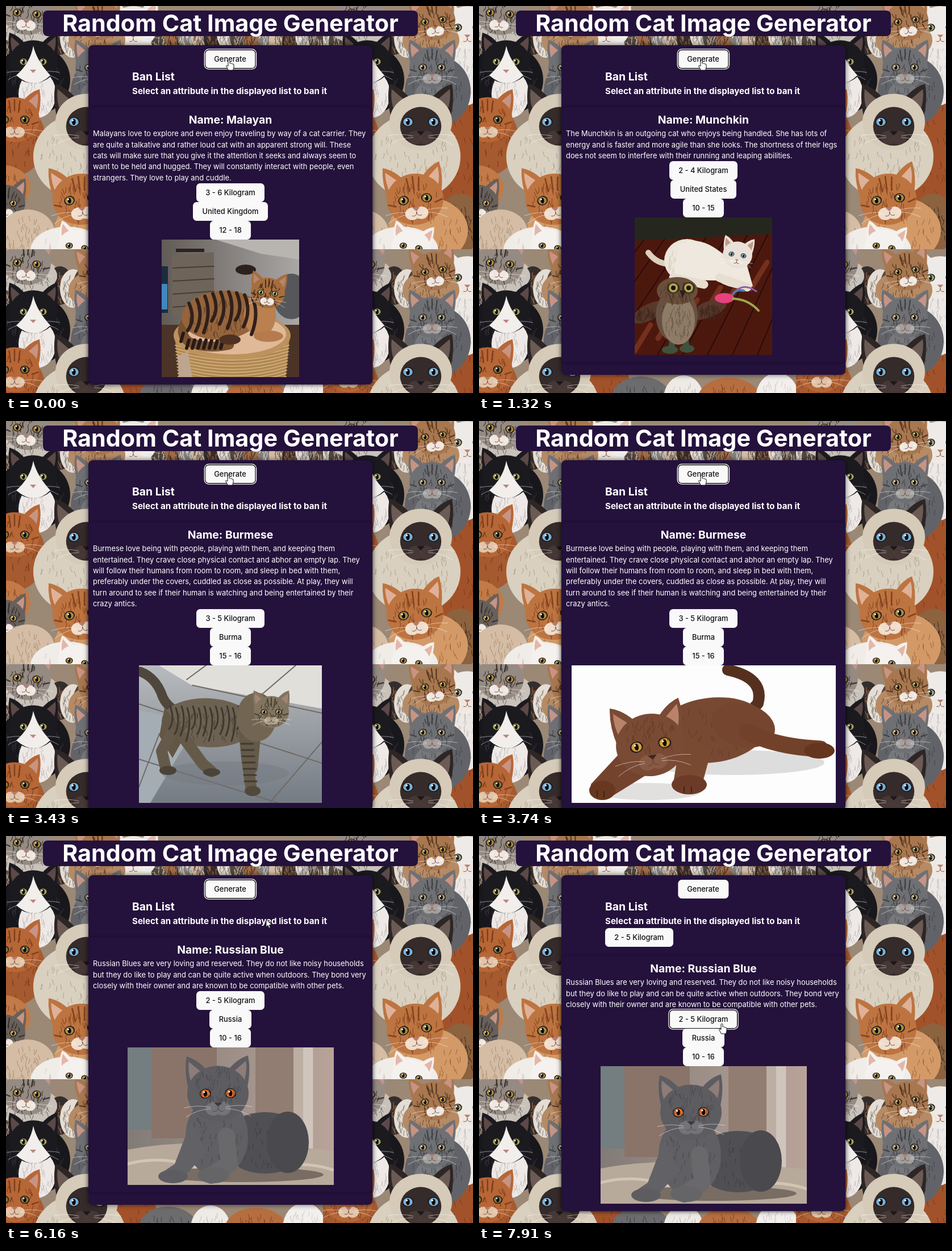
Write an HTML page that moves like this. It is 822 px wide and 681 px high and loops after 8 s.

```html
<!DOCTYPE html>
<html lang="en">
<head>
<meta charset="utf-8">
<title>Random Cat Image Generator</title>
<style>
html, body { margin: 0; width: 100%; height: 100%; overflow: hidden; }
body { position: relative; font: 12.9px/19.36px Inter, sans-serif; color: #fff; white-space: nowrap; }
svg { display: block; }
#backdrop { position: absolute; left: 0; top: 0; }
h1, h2, h3, p { margin: 0; font-weight: 700; }
h1 { position: absolute; left: 65px; top: 8px; width: 660px; height: 45px; border-radius: 8px;
  background: #24113c; text-align: center; font-size: 41.3px; line-height: 45px; }
#panel { position: absolute; left: 145px; top: 69px; width: 500px; min-height: 580px;
  border-radius: 8px; background: #24113c; box-shadow: 0 0 10px #0009; }
#bans { position: relative; height: 109px; }
#bans > * { position: absolute; left: 77px; }
#bans h2 { top: 41px; }
#bans h3 { top: 71px; font-size: 15.1px; line-height: 20px; }
h2 { font-size: 19.36px; line-height: 28px; }
#bans #generate { left: 250px; top: 8px; transform: translateX(-50%); margin-left: -.5px; }
#ban { top: 93px; }
#card { padding: 8px 0 13px; border-radius: 8px; box-shadow: 0 0 5px #0006; display: flex;
  flex-direction: column; align-items: center; }
#card h2 { margin-bottom: 1.2px; }
#card p { align-self: flex-start; margin-left: 8px; font-weight: 400; white-space: pre; }
.button { box-sizing: border-box; height: 33px; padding: 0 16.3px; border-radius: 6.5px;
  background: #f9f9f9; color: #111; font-weight: 500; line-height: 33px; }
.hover { box-shadow: inset 0 0 0 1px #646cff; }
.focus { box-shadow: inset 0 0 0 1px #101010, 0 0 0 .6px #101010, 0 0 0 1.8px #fff; }
#cursor { position: absolute; left: 0; top: 0; overflow: visible; }
</style>
</head>
<body>
<svg id="backdrop" width="822" height="681"></svg>
<h1>Random Cat Image Generator</h1>
<div id="panel">
  <div id="bans">
    <div id="generate" class="button">Generate</div>
    <h2>Ban List</h2>
    <h3>Select an attribute in the displayed list to ban it</h3>
    <div id="ban" class="button">2 - 5 Kilogram</div>
  </div>
  <div id="card">
    <h2 id="name"></h2>
    <p id="about"></p>
    <div id="weight" class="button"></div>
    <div id="origin" class="button"></div>
    <div id="life" class="button"></div>
    <svg id="photo" height="242"></svg>
  </div>
</div>
<svg id="cursor" width="1" height="1">
  <path id="arrow" d="M0 0V13L3 10.2L5 15L7.2 14L5.2 9.5H9.5Z" fill="#fff" stroke="#111" stroke-width=".9"/>
  <path id="hand" d="M-1.5 1.2Q0-1 1.5 1.2V6Q3 4.8 4 6.5Q5.6 5.6 6.4 7.2Q8.6 6.6 8.6 9V12Q8.4 15 7 18H-1L-5 10.6Q-4.6 8.4-1.5 11Z"
    fill="#fff" stroke="#111"/>
</svg>
<script>
const $ = id => document.getElementById(id);
let seed = 7;
const rand = (a = 0, b = 1) => a + (b - a) * ((seed = seed * 16807 % 2147483647) / 2147483647);

// Drawing helpers return SVG markup.
const rect = (x, y, w, h, fill, rx = 0) => `<rect x="${x}" y="${y}" width="${w}" height="${h}" rx="${rx}" fill="${fill}"/>`;
const oval = (x, y, rx, ry, fill, turn = 0) =>
  `<ellipse cx="${x}" cy="${y}" rx="${rx}" ry="${ry}" fill="${fill}" transform="rotate(${turn} ${x} ${y})"/>`;
const shape = (d, fill) => `<path d="${d}" fill="${fill}"/>`;
const line = (d, stroke, w = 1) =>
  `<path d="${d}" fill="none" stroke="${stroke}" stroke-width="${w}" stroke-linecap="round" stroke-linejoin="round"/>`;
const fade = (id, from, to, turn = 90) =>
  `<linearGradient id="${id}" gradientTransform="rotate(${turn})"><stop stop-color="${from}"/><stop offset="1" stop-color="${to}"/></linearGradient>`;
const repeat = (n, draw) => Array.from({ length: n }, (_, i) => draw(i)).join('');

function hairs(x, y, rx, ry, color, n = 50, len = 9, w = 1) {
  return line(repeat(n, () => {
    const a = rand(0, 6.283), r = Math.sqrt(rand()) * .92;
    return `M${(x + rx * r * Math.cos(a)).toFixed(1)} ${(y + ry * r * Math.sin(a)).toFixed(1)}q${rand(-2, 2).toFixed(1)} ${(len / 2).toFixed(1)} ${rand(-4, 4).toFixed(1)} ${len}`;
  }), color, w);
}

const body = (x, y, rx, ry, fill, hair, turn = 0) =>
  oval(x, y, rx, ry, fill, turn) + (hair ? hairs(x, y, rx * .9, ry * .8, hair) : '');

function head(x, y, r, fur, { ear = '#c79484', eye = '#a98b45', muzzle = '#efe7df', hair, mask, tilt = 0, nose = '#b77b70', ears = fur } = {}) {
  const side = s => shape(`M${s * .3 * r} ${-.7 * r}Q${s * .6 * r} ${-1.1 * r} ${s * r} ${-1.22 * r}Q${s * 1.1 * r} ${-.7 * r} ${s * .94 * r} ${-.1 * r}Z`, ears)
    + shape(`M${s * .5 * r} ${-.68 * r}L${s * .93 * r} ${-1.05 * r}Q${s * .98 * r} ${-.7 * r} ${s * .84 * r} ${-.32 * r}Z`, ear);
  const eyeAt = s => oval(s * .41 * r, 0, .19 * r, .16 * r, '#231a17', s * 10)
    + oval(s * .41 * r, 0, .15 * r, .13 * r, eye) + oval(s * .41 * r, 0, .06 * r, .1 * r, '#080808')
    + oval(s * .41 * r - .04 * r, -.05 * r, .03 * r, .03 * r, '#fff');
  const whiskers = s => line(`M${s * .25 * r} ${.45 * r}q${s * .4 * r} ${-.1 * r} ${s * .85 * r} 0M${s * .25 * r} ${.5 * r}q${s * .4 * r} 0 ${s * .8 * r} ${.25 * r}`, '#fff9', .8);
  return `<g transform="translate(${x} ${y}) rotate(${tilt})">` + side(-1) + side(1)
    + oval(0, 0, r, .9 * r, fur)
    + (hair ? hairs(0, 0, r * .9, r * .75, hair, 45, r / 5, 1.1)
      + line(`M${-.22 * r} ${-.75 * r}L${-.16 * r} ${-.3 * r}M0 ${-.8 * r}V${-.36 * r}M${.22 * r} ${-.75 * r}L${.16 * r} ${-.3 * r}M${-.95 * r} ${.1 * r}l${.25 * r} ${.08 * r}M${.95 * r} ${.1 * r}l${-.25 * r} ${.08 * r}`, hair, r / 18) : '')
    + (mask ? oval(0, .14 * r, .66 * r, .62 * r, mask) : '')
    + oval(-.16 * r, .5 * r, .25 * r, .22 * r, muzzle) + oval(.16 * r, .5 * r, .25 * r, .22 * r, muzzle)
    + shape(`M${-.13 * r} ${.3 * r}H${.13 * r}L0 ${.43 * r}Z`, nose)
    + line(`M${-.16 * r} ${.58 * r}Q0 ${.62 * r} 0 ${.44 * r}Q0 ${.62 * r} ${.16 * r} ${.58 * r}`, '#5a3c34', .8)
    + eyeAt(-1) + eyeAt(1) + whiskers(-1) + whiskers(1) + '</g>';
}

const furTones = ['#e5ddd3', '#514741', '#a26b45', '#85807c', '#d3bca5', '#332d2c'];
const kittens = rect(-30, -12, 588, 440, '#9b8875')
  + repeat(26, i => body(-20 + i * 23, 55 + rand(-12, 12), 23, 34, furTones[i % 6], furTones[(i + 3) % 6]))
  + body(212, 250, 55, 110, '#a2522a', '#743719')
  + body(222, 100, 38, 75, '#ece8e5', '#c9c1bc')
  + head(224, 38, 42, '#eeeae7', { eye: '#a6a47a', ear: '#e2b8a8' })
  + body(160, 60, 50, 35, '#b58a64', '#6e4a30')
  + head(165, 26, 38, '#a8774f', { hair: '#54351f', tilt: -8 })
  + body(35, 35, 55, 32, '#c9c2ba', '#6f6761')
  + head(37, 13, 42, '#958b83', { hair: '#3b3532', tilt: 5 })
  + body(172, 150, 58, 62, '#626368', '#3f4147')
  + body(158, 165, 28, 35, '#77787c', '#4b4d52')
  + head(162, 108, 40, '#6f7074', { hair: '#3e4044', muzzle: '#a3a09e', eye: '#a69a78' })
  + body(48, 130, 65, 62, '#18171c', '#343239')
  + body(55, 155, 33, 42, '#eee9e6', '#c5bebc')
  + head(48, 98, 42, '#1b1a1f', { eye: '#a3a366', ear: '#5d4948' })
  + shape('M48 70Q54 96 78 122Q50 150 18 122Q43 100 48 70', '#f1eeeb') + shape('M42 112h11l-5 6z', '#bd8580')
  + body(10, 235, 60, 65, '#a65a2f', '#783719')
  + head(15, 200, 44, '#b76636', { hair: '#7f3f1d', eye: '#88773f', muzzle: '#e2c4a8' })
  + body(130, 265, 82, 75, '#d9d0c0', '#aca08d')
  + head(142, 204, 55, '#d6cbb9', { ears: '#2d2625', ear: '#6c5b55', mask: '#352b2a', muzzle: '#463836', nose: '#1d1718', eye: '#78b1dc' })
  + body(285, 250, 52, 38, '#6c6b6d', '#403f42')
  + body(360, 250, 35, 40, '#eeeae6', '#c6bdb6')
  + body(440, 252, 55, 38, '#b66e3f', '#7d431f')
  + body(525, 250, 38, 45, '#f2efed', '#d7d0cc')
  + body(-5, 320, 48, 40, '#c17a48', '#824722')
  + body(212, 382, 40, 52, '#8c623f', '#3b281c')
  + body(155, 395, 70, 58, '#d39a68', '#a46336')
  + head(132, 340, 50, '#bd7440', { hair: '#854420', muzzle: '#f0ddcb', ear: '#deb198', tilt: -7 })
  + head(-2, 347, 36, '#68605b', { hair: '#342d29', eye: '#b79b54' })
  + body(38, 400, 48, 42, '#d5bda5', '#a88d76')
  + body(108, 430, 65, 42, '#f0ece8', '#d4c8c0')
  + head(125, 424, 34, '#f5f1ee', { ear: '#e3b7a8', tilt: 10 });

$('backdrop').innerHTML = `<pattern id="tile" patternUnits="userSpaceOnUse" x="-30" y="-12" width="588" height="440" viewBox="-30 -12 588 440">${kittens}</pattern>`
  + rect(0, 0, 822, 681, 'url(#tile)');

const stripes = (n, draw, color, w) => line(repeat(n, draw), color, w);

const photos = {
  toyger: [242, () => fade('wall', '#615b57', '#aaa7a5', 0) + rect(0, 0, 242, 242, 'url(#wall)')
    + shape('M95 0H242V35L175 25Z', '#b7b4b1') + rect(0, 150, 242, 92, '#4b3327')
    + shape('M18 28L92 22V135H18Z', '#6f6459') + stripes(4, i => `M20 ${50 + i * 23}L92 ${47 + i * 22}`, '#453d37', 2)
    + rect(0, 47, 11, 82, '#1c2c3d') + rect(0, 78, 10, 45, '#4087bd') + oval(148, 53, 18, 9, '#2c211d') + rect(25, 16, 50, 6, '#292423')
    + oval(228, 100, 32, 40, '#55575a') + shape('M22 165L32 242H218L226 165Z', '#ad8651')
    + stripes(11, i => `M${24 + i * .5} ${186 + i * 5.5}Q125 ${216 + i * 5.5} ${224 - i * .5} ${186 + i * 5.5}`, '#d0ab75', 2)
    + oval(124, 169, 103, 42, '#bd925d') + oval(124, 166, 95, 36, '#dfb998') + shape('M28 205l18-8 8 45H30z', '#bda58f')
    + line('M65 118Q20 160 48 180Q80 194 119 185', '#785030', 17) + stripes(8, i => `M${38 + i * 10} ${165 + (i ? 12 : 0)}l-4 14`, '#261a16', 6)
    + body(105, 133, 70, 43, '#95643b', '#5c3820', -5) + oval(173, 133, 28, 38, '#ba8050')
    + stripes(9, i => `M${48 + i * 14} ${112 - Math.sin(i / 3) * 20}q12 28-2 ${48 + i % 3 * 8}`, '#30201a', 6)
    + oval(120, 176, 19, 9, '#4e3123') + oval(188, 170, 26, 10, '#b57b4c')
    + head(187, 94, 30, '#a66e3d', { hair: '#37221a', eye: '#a7b46a', ear: '#b58670', tilt: 6 })],

  owl: [242, () => rect(0, 0, 242, 242, '#4c180e')
    + stripes(11, i => `M${-180 + i * 44} 242L${-10 + i * 35} 28`, '#2a0b08', 2)
    + stripes(7, i => `M${i * 41} ${235 - i * 22}l28-46`, '#74301c', 9)
    + shape('M0 0H242V29L0 41Z', '#25271f') + line('M68 82Q40 84 24 62', '#ddd0bd', 10)
    + body(92, 76, 40, 38, '#ece5d9', '#d2c7b7') + shape('M78 48Q113 27 160 68L196 78L208 121Q178 132 144 111L67 110Z', '#eee8de')
    + line('M68 106L122 118M149 106L198 123', '#e7ded0', 15)
    + head(181, 66, 26, '#e9e1d7', { eye: '#77a3b8', ear: '#c49888', tilt: 8 })
    + body(25, 167, 33, 14, '#58382a', '#3c251d', -28) + body(130, 162, 34, 14, '#58382a', '#3c251d', -22)
    + line('M69 205l-5 27M89 206l2 25', '#40523d', 11) + oval(62, 233, 14, 7, '#40523d') + oval(92, 231, 13, 7, '#40523d')
    + body(74, 172, 37, 48, '#665042', '#49372e') + body(77, 181, 29, 43, '#8e7b67', '#6c5948')
    + body(75, 129, 36, 24, '#694f3b', '#49352a') + repeat(2, i => oval(68 + i * 27, 124, 11, 10, '#302c21') + oval(68 + i * 27, 124, 8, 8, '#b4a14b') + oval(68 + i * 27, 124, 4, 4, '#17140f'))
    + shape('M79 128l5 15 6-14z', '#302019') + oval(158, 142, 17, 9, '#e6417e')
    + line('M171 137q18-25 43-7', '#8960ae', 3) + line('M173 143q27 1 45 21', '#9aa948', 4) + line('M174 134q5-8 18-5', '#5579a8', 4)],

  kitchen: [322, () => rect(0, 0, 322, 242, '#574231') + rect(0, 0, 104, 84, '#b78b4f') + rect(0, 0, 38, 82, '#3a5875')
    + rect(66, 35, 35, 45, '#c5a34e') + rect(103, 0, 20, 85, '#332720') + rect(125, 8, 105, 76, '#a77743')
    + rect(230, 0, 92, 83, '#6f5137') + rect(245, 29, 77, 52, '#3975a3') + rect(0, 0, 322, 10, '#322822')
    + rect(0, 80, 322, 9, '#241a17') + rect(0, 89, 322, 58, '#2d211c') + stripes(22, i => `M${i * 16} 90v56`, '#493326', 1)
    + rect(10, 43, 20, 33, '#a4a29f', 3) + oval(106, 68, 26, 18, '#1e1919') + rect(86, 41, 11, 42, '#8b7b69')
    + rect(0, 139, 322, 103, '#816038') + hairs(161, 194, 170, 55, '#b18b55', 190, 2, 2) + hairs(161, 194, 170, 55, '#443423', 190, 2, 1.5)
    + shape('M10 139H115L102 190L3 173Z', '#161719') + line('M8 172L105 187L120 139', '#817c74', 3) + line('M65 132V108Q83 91 91 111', '#b8b8b1', 5)
    + rect(235, 93, 25, 68, '#655e59', 5) + rect(240, 96, 5, 62, '#b5b1ad') + rect(283, 93, 20, 13, '#e65532', 3)
    + shape('M281 106h24l5 22-2 52q-18 8-37 0l-2-53z', '#b6733b') + rect(274, 137, 30, 29, '#777c6a', 2)
    + line('M210 119Q220 70 206 38L181 18', '#e3cda9', 22) + body(178, 144, 61, 48, '#ead9bd', '#cfb490')
    + line('M137 164L157 224M164 177L160 211M208 165L204 201M225 151L225 206', '#e9d7bd', 23) + oval(158, 226, 13, 10, '#eee2cc')
    + oval(145, 143, 36, 38, '#eadbc5') + head(126, 110, 33, '#ead9c2', { ear: '#d8a88b', eye: '#8a8155', tilt: -5 })],

  terrace: [322, () => fade('stone', '#b8bbbe', '#747b83') + rect(0, 0, 322, 242, 'url(#stone)')
    + shape('M35 0H322V76L93 35Z', '#e0dfda') + shape('M0 79L105 99L20 242H0Z', '#a4adb4')
    + line('M0 68L322 172M-10 162L245 242M94 35L322 84M36 120L0 214M322 135L230 242M118 0L84 25M276 0L213 54', '#706a64', 2)
    + oval(152, 190, 112, 21, '#70777d66') + line('M60 77Q44 66 39 48Q27 20 2 11', '#50473c', 17)
    + body(122, 101, 82, 43, '#6d6251', '#463d32', 3) + shape('M45 75L36 124L59 163L82 122Z', '#625646')
    + line('M56 120L40 151L47 180M79 128L112 173L128 187M185 112L190 163L198 220M205 116L199 181', '#655a49', 20)
    + oval(51, 185, 15, 8, '#4b4338') + oval(128, 188, 15, 7, '#4b4338') + oval(200, 221, 14, 9, '#51483c')
    + stripes(15, i => `M${55 + i * 10} ${72 + i % 2 * 3}q9 25-2 ${40 + i % 4 * 6}`, '#3f382f', 3)
    + stripes(7, i => `M${180 + i} ${138 + i * 11}h21`, '#403a31', 3) + oval(207, 91, 35, 43, '#726653')
    + head(233, 82, 31, '#817560', { hair: '#443b30', muzzle: '#b0a28b', eye: '#a59a62', ear: '#a18471' })],

  brown: [465, () => rect(0, 0, 465, 242, '#fdfdfd') + oval(285, 171, 160, 22, '#dedddd') + oval(135, 222, 93, 15, '#e2e0df')
    + line('M275 8Q340 22 328 67L303 94', '#55301f', 20) + body(246, 114, 99, 57, '#784932', '#62371f', -7)
    + oval(302, 105, 57, 38, '#75452f', 15) + line('M309 116Q355 143 438 147', '#724129', 29) + oval(436, 150, 27, 14, '#65351f')
    + shape('M89 150L34 209Q33 238 65 234L141 187Z', '#74432e') + shape('M194 116L246 149L227 220Q196 236 178 213Z', '#7a4932')
    + oval(54, 220, 23, 17, '#67371f') + oval(207, 210, 31, 17, '#6c3b28') + line('M45 221v10M57 222v10M198 214v10M211 214v10', '#3d2319', 2)
    + head(139, 140, 61, '#794a34', { ear: '#b9826b', eye: '#d4a13a', muzzle: '#885943', nose: '#40251e', tilt: -9 }) + hairs(139, 120, 52, 35, '#62371f', 45)],

  gray: [363, () => fade('room', '#817b77', '#b9a399', 0) + rect(0, 0, 363, 242, 'url(#room)')
    + rect(0, 0, 42, 145, '#747d80') + rect(42, 0, 115, 160, '#8a7469') + rect(225, 0, 67, 185, '#927d73') + rect(292, 0, 35, 185, '#bdaea4') + rect(309, 0, 17, 185, '#d0c5bc')
    + shape('M0 180Q125 155 363 182V242H0Z', '#b8aa9b') + line('M0 205Q80 185 150 225M185 231Q290 190 363 216', '#d3c5b4', 5)
    + oval(200, 224, 145, 13, '#786c63') + body(242, 168, 76, 54, '#505054', '#3c3d42') + oval(282, 167, 37, 54, '#49494e')
    + body(157, 157, 55, 71, '#606064', '#47484d') + shape('M112 130L83 205L55 224Q62 243 95 232L139 185Z', '#626266')
    + line('M174 156L179 205L148 225', '#69696c', 30) + oval(151, 225, 28, 14, '#656568') + oval(80, 227, 26, 12, '#5d5d61')
    + head(159, 81, 54, '#5c5c61', { ear: '#8d7c78', eye: '#e9712b', muzzle: '#737378', nose: '#38383d', tilt: -1 }) + hairs(159, 63, 43, 35, '#48494e', 60)]
};
for (const key in photos) photos[key][1] = photos[key][1]();

const cats = [
  [0, 'Malayan', `Malayans love to explore and even enjoy traveling by way of a cat carrier. They
are quite a talkative and rather loud cat with an apparent strong will. These
cats will make sure that you give it the attention it seeks and always seem to
want to be held and hugged. They will constantly interact with people, even
strangers. They love to play and cuddle.`, '3 - 6', 'United Kingdom', '12 - 18'],
  [560, 'Khao Manee', `The Khao Manee is highly intelligent, with an extrovert and inquisitive
nature, however they are also very calm and relaxed, making them an
idea lap cat.`, '3 - 5', 'Thailand', '10 - 12'],
  [1320, 'Munchkin', `The Munchkin is an outgoing cat who enjoys being handled. She has lots of
energy and is faster and more agile than she looks. The shortness of their legs
does not seem to interfere with their running and leaping abilities.`, '2 - 4', 'United States', '10 - 15'],
  [2470, 'Cyprus', `Loving, loyal, social and inquisitive, the Cyprus cat forms strong ties with their
families and love nothing more than to be involved in everything that goes on in
their surroundings. They are not overly active by nature which makes them the
perfect companion for people who would like to share their homes with a laid-
back relaxed feline companion.`, '4 - 7', 'Cyprus', '12 - 15'],
  [3430, 'Burmese', `Burmese love being with people, playing with them, and keeping them
entertained. They crave close physical contact and abhor an empty lap. They
will follow their humans from room to room, and sleep in bed with them,
preferably under the covers, cuddled as close as possible. At play, they will
turn around to see if their human is watching and being entertained by their
crazy antics.`, '3 - 5', 'Burma', '15 - 16'],
  [4640, 'Russian Blue', `Russian Blues are very loving and reserved. They do not like noisy households
but they do like to play and can be quite active when outdoors. They bond very
closely with their owner and are known to be compatible with other pets.`, '2 - 5', 'Russia', '10 - 16']
];
const photoTimes = [[0, 'toyger'], [860, 'owl'], [1780, 'kitchen'], [2750, 'terrace'], [3740, 'brown'], [5200, 'gray']];
const pointer = [
  [0, 392.5, 95, 'hand'], [280, 391.5, 95, 'hand'], [6160, 458, 147, 'arrow'], [6280, 549, 267, 'arrow'],
  [6430, 440, 309, 'arrow'], [6580, 420, 292, 'hand'], [6700, 409, 283, 'hand'], [6850, 408, 280, 'hand'],
  [6970, 407, 278, 'hand'], [7520, 413, 283, 'arrow'], [7640, 428, 296, 'arrow'], [7760, 440, 308, 'hand'], [7910, 427.5, 330, 'hand']
];
const at = (track, t) => track.findLast(step => step[0] <= t);

let shownCat, shownPhoto;
function draw(t) {
  const cat = at(cats, t), photo = at(photoTimes, t)[1], [, x, y, kind] = at(pointer, t);
  const banned = t >= 7400;
  if (cat !== shownCat) {
    const [, name, about, weight, origin, life] = shownCat = cat;
    Object.entries({ name: 'Name: ' + name, about, weight: weight + ' Kilogram', origin, life })
      .forEach(([id, text]) => $(id).textContent = text);
  }
  if (photo !== shownPhoto) {
    shownPhoto = photo;
    $('photo').setAttribute('width', photos[photo][0]);
    $('photo').innerHTML = photos[photo][1];
  }
  $('bans').style.height = (banned ? 142 : 109) + 'px';
  $('ban').style.display = banned ? '' : 'none';
  $('generate').className = banned ? 'button' : 'button focus';
  $('weight').className = banned ? 'button focus' : t >= 6580 ? 'button hover' : 'button';
  for (const id of ['arrow', 'hand']) $(id).style.display = id === kind ? '' : 'none';
  $('cursor').style.transform = `translate(${x}px, ${y}px)`;
}

const start = performance.now();
function tick() {
  draw((performance.now() - start) % 8000);
  requestAnimationFrame(tick);
}
tick();
</script>
</body>
</html>
```
